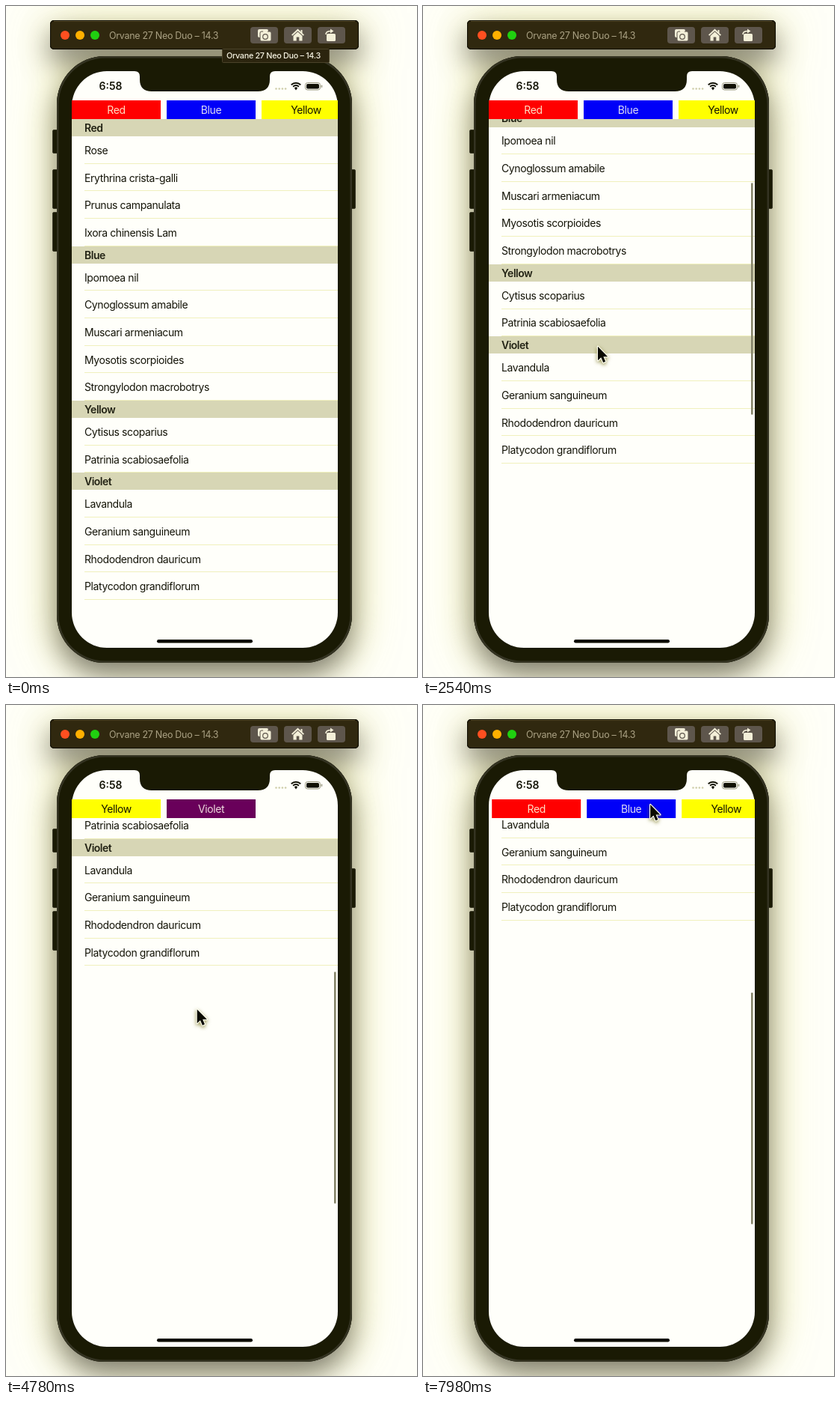
Write an HTML page with a canvas that moves like this. It is 550 px wide and 896 px high and loops after 8 s.

```html
<!DOCTYPE html>
<html lang="en">
<head>
<meta charset="utf-8">
<title>Flower list</title>
<style>
html, body { margin: 0; width: 100%; height: 100%; overflow: hidden; background: #fffff8; }
canvas { display: block; }
</style>
</head>
<body>
<canvas id="stage" width="550" height="896"></canvas>
<script>
const ctx = document.getElementById('stage').getContext('2d');
const LOOP = 8000;
const DEVICE = 'Orvane 27 Neo Duo – 14.3';
const PAPER = '#fffffa';
const SCREEN = { x: 88, y: 87, w: 356, h: 770 };
const LIST_TOP = 151, ROW = 36.67, HEAD = 23;
const TAB_W = 119, TAB_STEP = 127;

const sections = [
  { name: 'Red', fill: '#ff0000', ink: '#ffdfc4',
    rows: ['Rose', 'Erythrina crista-galli', 'Prunus campanulata', 'Ixora chinensis Lam'] },
  { name: 'Blue', fill: '#0000f8', ink: '#dedcf2',
    rows: ['Ipomoea nil', 'Cynoglossum amabile', 'Muscari armeniacum', 'Myosotis scorpioides', 'Strongylodon macrobotrys'] },
  { name: 'Yellow', fill: '#ffff00', ink: '#141400',
    rows: ['Cytisus scoparius', 'Patrinia scabiosaefolia'] },
  { name: 'Violet', fill: '#69005a', ink: '#ecd9dc',
    rows: ['Lavandula', 'Geranium sanguineum', 'Rhododendron dauricum', 'Platycodon grandiflorum'] }
];

// Motion tracks: [time, value]
const scrollKeys = [[0, 0], [880, 0], [1560, 96.3], [1720, 125], [2050, 150], [2330, 150], [2540, 182],
  [2880, 252], [3080, 282], [3350, 298], [3550, 298], [3900, 365.5], [4120, 416], [4350, 440],
  [4700, 440], [5200, 505.3], [8000, 505.3]];
const tabKeys = [[0, 0], [2580, 0], [2880, 127], [4050, 127], [4350, 254], [5130, 254], [5400, 263],
  [6680, 263], [7260, 118], [7480, 84], [7650, 76], [7980, -4], [8000, -7]];
const cursorX = [[0, 296], [400, 296], [880, 229], [1560, 230], [2330, 234], [2540, 234], [2880, 238],
  [3550, 252], [3900, 253], [4700, 256], [5200, 252], [5750, 252], [6600, 378], [6680, 378], [7260, 523],
  [7600, 225], [7650, 225], [7980, 304], [8000, 307]];
const cursorY = [[0, 52], [400, 52], [880, 486], [1560, 390], [1720, 372], [2250, 487], [2330, 487],
  [2540, 455], [2880, 386], [3450, 476], [3550, 476], [3900, 409], [4120, 358], [4600, 411], [4700, 411],
  [5200, 346], [5750, 346], [6600, 136], [6680, 136], [7260, 130], [7980, 133], [8000, 133]];

// Monotone cubic interpolation through the keys
function track(keys, t) {
  const last = keys.length - 2;
  let i = 0;
  while (i < last && t >= keys[i + 1][0]) i++;
  const slope = k => (keys[k + 1][1] - keys[k][1]) / (keys[k + 1][0] - keys[k][0]);
  const tangent = k => {
    if (k <= 0 || k > last) return slope(k <= 0 ? 0 : last);
    const a = slope(k - 1), b = slope(k);
    return a * b <= 0 ? 0 : 2 * a * b / (a + b);
  };
  const [t0, v0] = keys[i], [t1, v1] = keys[i + 1];
  const h = t1 - t0, u = (t - t0) / h, w = 1 - u;
  return v0 * w * w * (1 + 2 * u) + v1 * u * u * (3 - 2 * u)
    + h * u * w * (w * tangent(i) - u * tangent(i + 1));
}

function box(x, y, w, h, r, fill, stroke) {
  ctx.beginPath();
  ctx.roundRect(x, y, w, h, r);
  if (fill) { ctx.fillStyle = fill; ctx.fill(); }
  if (stroke) { ctx.strokeStyle = stroke; ctx.stroke(); }
}

function dot(x, y, r, fill) {
  ctx.beginPath();
  ctx.arc(x, y, r, 0, Math.PI * 2);
  ctx.fillStyle = fill;
  ctx.fill();
}

function poly(points, fill) {
  ctx.beginPath();
  points.forEach(([x, y]) => ctx.lineTo(x, y));
  ctx.closePath();
  ctx.fillStyle = fill;
  ctx.fill();
}

function label(text, x, y, { size = 14, weight = 400, ink = '#141408', gap = -0.4, align = 'left' } = {}) {
  ctx.font = `${weight} ${size}px Inter, sans-serif`;
  ctx.letterSpacing = gap + 'px';
  ctx.textAlign = align;
  ctx.textBaseline = 'alphabetic';
  ctx.fillStyle = ink;
  ctx.fillText(text, x, y + size * 0.355);
}

function clipTo(x, y, w, h, draw) {
  ctx.save();
  ctx.beginPath();
  ctx.rect(x, y, w, h);
  ctx.clip();
  draw();
  ctx.restore();
}

function drawShadow() {
  const layers = [['rgba(225,222,70,.55)', 62, 8], ['rgba(85,82,88,.72)', 36, 17]];
  for (const [color, blur, dy] of layers) {
    ctx.save();
    ctx.shadowColor = color;
    ctx.shadowBlur = blur;
    ctx.shadowOffsetY = dy;
    ctx.beginPath();
    ctx.roundRect(59, 19, 413, 39, 5);
    ctx.roundRect(68, 67, 395, 810, 64);
    ctx.fillStyle = '#1a1a04';
    ctx.fill();
    ctx.restore();
  }
}

function drawToolbar() {
  ctx.lineWidth = 1;
  box(59.5, 19.5, 412, 38, 5, '#30280f', '#0c0a00');
  ctx.fillStyle = '#554a2a';
  ctx.fillRect(64, 20, 403, 1);
  ['#ff4f20', '#ffb000', '#20d010'].forEach((c, i) => dot(79 + i * 20, 39, 6, c));
  label(DEVICE, 138, 39.5, { size: 12.5, ink: '#aaa183', gap: -0.3 });
  [327, 372, 417].forEach(x => box(x, 28, 37, 22, 4, '#5e564c'));

  const ink = '#f3efd8', gap = '#5e564c';
  box(337, 31, 14, 11, 2, ink);
  box(340, 34, 15, 13, 2, ink, gap);
  box(344, 32.5, 6, 3, 1, ink);
  ctx.lineWidth = 1.2;
  ctx.beginPath();
  ctx.arc(347, 41, 3.3, 0, 7);
  ctx.strokeStyle = gap;
  ctx.stroke();

  poly([[390.5, 30.5], [399, 38.5], [397.7, 39.8], [390.5, 33.2], [383.3, 39.8], [382, 38.5]], ink);
  poly([[390.5, 34.5], [396.5, 40], [396.5, 46.5], [392.3, 46.5], [392.3, 41.5],
    [388.7, 41.5], [388.7, 46.5], [384.5, 46.5], [384.5, 40]], ink);
  ctx.fillStyle = ink;
  ctx.fillRect(394.5, 32, 2, 4);

  box(429, 37, 12, 10, 1.5, ink);
  ctx.beginPath();
  ctx.moveTo(428, 38);
  ctx.quadraticCurveTo(428, 33.5, 435, 33.5);
  ctx.lineWidth = 1.6;
  ctx.strokeStyle = ink;
  ctx.stroke();
  poly([[434, 30.5], [438.5, 33.5], [434, 36.5]], ink);
}

function drawPhone() {
  const edge = '#3b3a28', shell = '#1a1a04';
  ctx.lineWidth = 1;
  [[62.5, 165, 31], [62.5, 218, 52], [62.5, 275, 52], [460.5, 218, 52]]
    .forEach(([x, y, h]) => box(x, y + 0.5, 7, h, 1.5, shell, edge));
  box(68, 67, 395, 810, 64, '#343322');
  box(70.5, 69.5, 390, 805, 62, shell);
  box(SCREEN.x, SCREEN.y, SCREEN.w, SCREEN.h, 47, PAPER);

  ctx.beginPath();
  ctx.moveTo(172, 86);
  ctx.lineTo(172, 87);
  ctx.quadraticCurveTo(179, 87, 179, 94);
  ctx.lineTo(179, 98);
  ctx.quadraticCurveTo(179, 114, 195, 114);
  ctx.lineTo(337, 114);
  ctx.quadraticCurveTo(353, 114, 353, 98);
  ctx.lineTo(353, 94);
  ctx.quadraticCurveTo(353, 87, 360, 87);
  ctx.lineTo(360, 86);
  ctx.fillStyle = shell;
  ctx.fill();
}

function drawStatus() {
  label('6:58', 124.5, 107, { weight: 600, gap: 0 });
  for (let i = 0; i < 4; i++) dot(361.5 + i * 4.2, 110.5, 1.3, '#cfceaa');

  ctx.strokeStyle = '#101004';
  ctx.lineWidth = 2;
  const a = Math.PI * 1.25, b = Math.PI * 1.75;
  [8.8, 5.4].forEach(r => {
    ctx.beginPath();
    ctx.arc(388, 111.5, r, a, b);
    ctx.stroke();
  });
  ctx.beginPath();
  ctx.moveTo(388, 112.5);
  ctx.arc(388, 111.5, 3, a, b);
  ctx.fillStyle = '#101004';
  ctx.fill();

  ctx.lineWidth = 1;
  box(400.5, 102.5, 20, 9.5, 3, null, '#96957c');
  box(402, 104, 17, 6.5, 1.8, '#101004');
  box(421.8, 105.5, 1.4, 3.5, 0.7, '#96957c');
}

function drawTabs(offset) {
  clipTo(SCREEN.x, 126, SCREEN.w, 25, () => {
    sections.forEach((s, i) => {
      const x = SCREEN.x + i * TAB_STEP - offset;
      ctx.fillStyle = s.fill;
      ctx.fillRect(x, 126, TAB_W, 25);
      label(s.name, x + TAB_W / 2, 139, { ink: s.ink, align: 'center' });
    });
  });
}

function drawList(offset, barAlpha) {
  clipTo(SCREEN.x, LIST_TOP, SCREEN.w, 690, () => {
    let y = LIST_TOP - offset;
    for (const s of sections) {
      ctx.fillStyle = '#d7d6b5';
      ctx.fillRect(SCREEN.x, Math.round(y), SCREEN.w, HEAD);
      label(s.name, 105, y + 12, { weight: 600, ink: '#222214', gap: -0.5 });
      y += HEAD;
      for (const name of s.rows) {
        label(name, 105, y + 19);
        y += ROW;
        ctx.fillStyle = '#f0f0bd';
        ctx.fillRect(105, Math.round(y) - 1, 339, 1);
      }
    }
    ctx.globalAlpha = barAlpha;
    box(439, 153 + offset * 0.457, 2.6, 309.5, 1.3, '#85846a');
    ctx.globalAlpha = 1;
  });
}

function drawTooltip() {
  ctx.lineWidth = 1;
  box(289.5, 57.5, 143, 18, 1, '#2b240e', '#4b432a');
  label(DEVICE, 295, 66.5, { size: 10.8, weight: 500, ink: '#f6f3e2', gap: -0.3 });
}

function drawCursor(x, y) {
  const shape = [[0, 0], [0, 18.5], [4.3, 14.5], [7.2, 21.2], [10.2, 19.9], [7.4, 13.4], [13.2, 13.4]];
  ctx.save();
  ctx.translate(x, y);
  ctx.shadowColor = 'rgba(120,115,30,.6)';
  ctx.shadowBlur = 5;
  ctx.shadowOffsetY = 2;
  poly(shape, '#fffff0');
  ctx.lineWidth = 2.4;
  ctx.lineJoin = 'round';
  ctx.strokeStyle = '#fffff0';
  ctx.stroke();
  ctx.shadowColor = 'transparent';
  poly(shape, '#0a0a00');
  ctx.restore();
}

function frame() {
  const t = performance.now() % LOOP;
  ctx.fillStyle = '#fffff8';
  ctx.fillRect(0, 0, 550, 896);
  drawShadow();
  drawToolbar();
  drawPhone();
  drawStatus();
  drawList(track(scrollKeys, t), Math.min(1, Math.max(0, (t - 900) / 120)));
  drawTabs(track(tabKeys, t));
  box(202, 846, 128, 4.5, 2.2, '#0a0a00');
  if (t < 400) drawTooltip();
  else drawCursor(track(cursorX, t), track(cursorY, t));
  requestAnimationFrame(frame);
}
frame();
</script>
</body>
</html>
```
